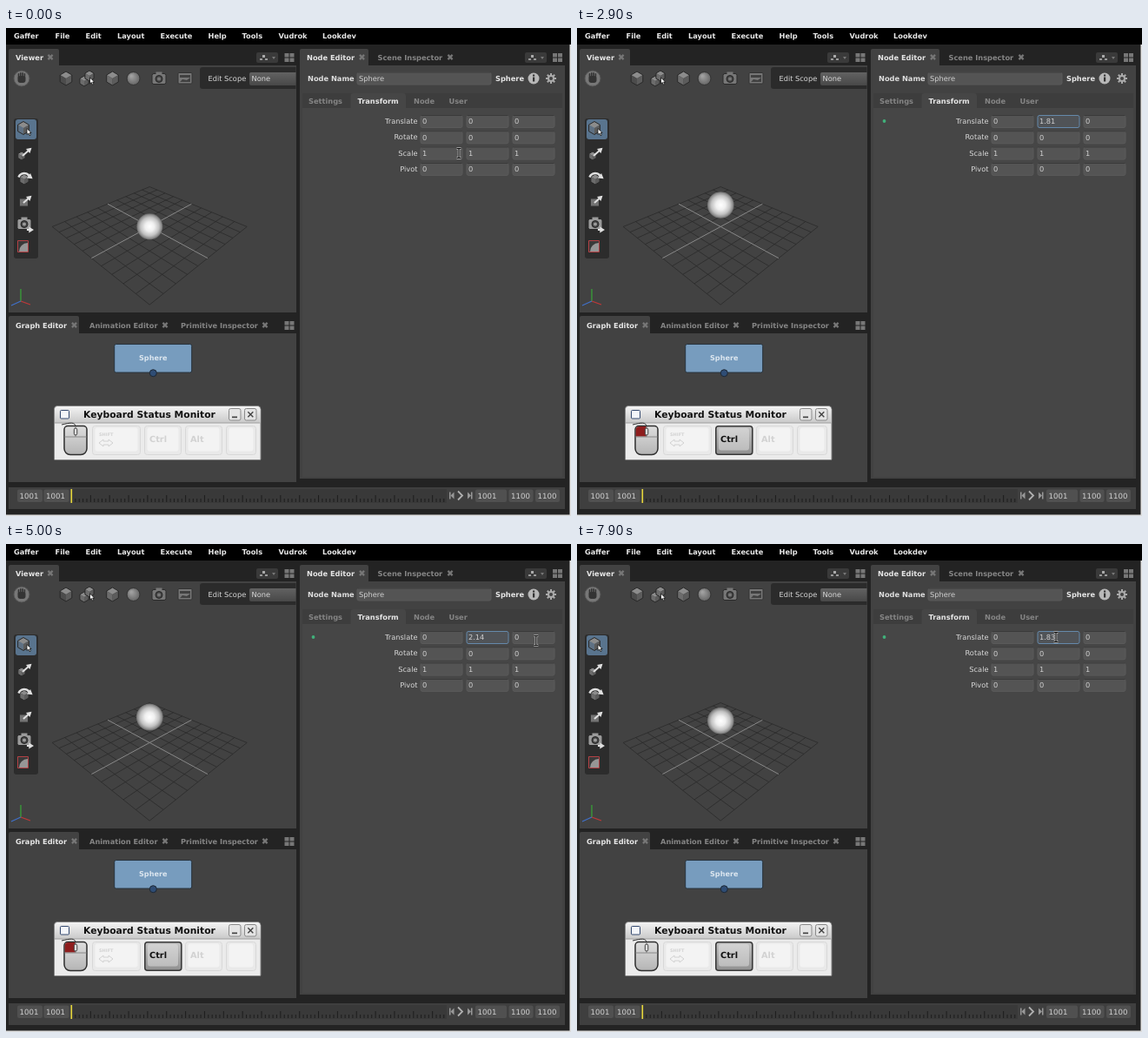
These frames come from a looping animation (650x561 px, 8000 ms). An HTML page with a canvas:

```html
<!DOCTYPE html>
<html lang="en">
<head>
<meta charset="utf-8">
<title>Numeric field dragging</title>
<style>
html, body { margin: 0; width: 100%; height: 100%; overflow: hidden; background: #232323; }
canvas { display: block; width: 650px; height: 561px; }
</style>
</head>
<body>
<canvas id="stage" width="650" height="561"></canvas>
<script>
const ctx = document.getElementById('stage').getContext('2d');
const LOOP = 8000, STEP = 100;

// Tracks hold [time, ...values] and are read with linear interpolation.
const POINTER = [
  [0, 521, 144], [700, 582, 107], [900, 560, 105], [1200, 558, 105], [1300, 551, 107],
  [1900, 551, 107], [2500, 621, 107], [2900, 732, 108], [3200, 752, 109], [3400, 642, 110],
  [4100, 550, 112], [4300, 549, 112], [4600, 549, 112], [5100, 625, 111], [5400, 618, 111],
  [5600, 558, 111], [5900, 574, 108], [7500, 574, 108], [7900, 551, 107]
];
const HEIGHT = [
  [1900, 0], [2500, 0.71], [2900, 1.81], [3200, 3], [3400, 2.48], [4100, 1.53],
  [4600, 1.53], [5100, 2.29], [5400, 2.2], [5600, 1.63], [5900, 1.83]
];
const PRESSED = [[900, 1200], [1700, 4400], [4600, 6200]];
const CTRL = [[1500, 6600], [7100, LOOP]];
const CARET = [[1000, 1500], [6100, 6600], [7100, 7600]];

const during = (spans, t) => spans.some(([a, b]) => t >= a && t < b);

function sample(track, t) {
  const next = track.findIndex(key => key[0] > t);
  if (next === 0) return track[0].slice(1);
  if (next < 0) return track[track.length - 1].slice(1);
  const a = track[next - 1], b = track[next], f = (t - a[0]) / (b[0] - a[0]);
  return a.slice(1).map((v, i) => v + (b[i + 1] - v) * f);
}

function rect(x, y, w, h, fill, radius = 0, stroke, width = 1) {
  ctx.beginPath();
  ctx.roundRect(x, y, w, h, radius);
  if (fill) { ctx.fillStyle = fill; ctx.fill(); }
  if (stroke) { ctx.strokeStyle = stroke; ctx.lineWidth = width; ctx.stroke(); }
}

function line(points, color, width = 1, close = false, fill) {
  ctx.beginPath();
  points.forEach(([x, y], i) => i ? ctx.lineTo(x, y) : ctx.moveTo(x, y));
  if (close) ctx.closePath();
  if (fill) { ctx.fillStyle = fill; ctx.fill(); }
  if (color) { ctx.strokeStyle = color; ctx.lineWidth = width; ctx.stroke(); }
}

function disc(x, y, r, fill, stroke, width = 1) {
  ctx.beginPath();
  ctx.arc(x, y, r, 0, 7);
  if (fill) { ctx.fillStyle = fill; ctx.fill(); }
  if (stroke) { ctx.strokeStyle = stroke; ctx.lineWidth = width; ctx.stroke(); }
}

function text(str, x, y, color, { bold = false, size = 8.25, align = 'left' } = {}) {
  ctx.font = `${bold ? 'bold ' : ''}${size}px "DejaVu Sans", sans-serif`;
  ctx.textRendering = 'geometricPrecision';
  ctx.textAlign = align;
  ctx.fillStyle = color;
  ctx.fillText(str, x, y);
}
const bold = (str, x, y, color) => text(str, x, y, color, { bold: true });

function vertical(y0, y1, ...colors) {
  const g = ctx.createLinearGradient(0, y0, 0, y1);
  colors.forEach((c, i) => g.addColorStop(i / (colors.length - 1), c));
  return g;
}

function cross(x, y, r, color, width) {
  line([[x - r, y - r], [x + r, y + r]], color, width);
  line([[x + r, y - r], [x - r, y + r]], color, width);
}

function field(x, y, w, str, focused = false) {
  rect(x + .5, y + .5, w - 1, 14, focused ? '#505357' : '#545454', 2, focused ? '#6589ab' : '#5a5a5a');
  if (!focused) rect(x + 1, y, w - 2, 1, '#3a3a3a');
  text(str, x + 2.5, y + 10.2, '#d0d0d0');
}

function tab(label, x, closeX, y, active) {
  bold(label, x, y + 3, active ? '#e6e6e6' : '#858585');
  cross(closeX, y, 2.6, '#777', 2.2);
}

function layoutButton(x, y) {
  for (let i = 0; i < 4; i++) rect(x - 5.5 + (i % 2) * 6, y - 5 + (i >> 1) * 5.5, 5, 4.5, '#777');
}

function pinButton(x, y) {
  rect(x - 13, y - 6, 25, 12, '#3a3a3a', 2);
  rect(x - 6, y - 3, 3, 3, '#aaa');
  rect(x - 9, y + 1, 3, 2, '#999');
  rect(x - 3, y + 1, 3, 2, '#999');
  line([[x + 5, y - 1], [x + 9, y - 1], [x + 7, y + 2]], null, 1, true, '#777');
}

function cube(x, y, r, face = '#6c6c6c') {
  const h = r * .5, w = r * .85;
  line([[x, y - r], [x + w, y - h], [x, y], [x - w, y - h]], null, 1, true, '#8c8c8c');
  line([[x - w, y - h], [x, y], [x, y + r], [x - w, y + h]], null, 1, true, face);
  line([[x + w, y - h], [x, y], [x, y + r], [x + w, y + h]], null, 1, true, '#5c5c5c');
  line([[x, y - r], [x + w, y - h], [x + w, y + h], [x, y + r], [x - w, y + h], [x - w, y - h]], '#292929', 1, true);
}

function camera(x, y, color) {
  rect(x - 8, y - 5, 16, 12, color, 2, '#2a2a2a');
  rect(x - 3.5, y - 7, 7, 3, color);
  disc(x, y + 1, 4, '#444', '#262626');
  disc(x, y + 1, 2, color);
}

function arrow(x0, y0, x1, y1, color) {
  const a = Math.atan2(y1 - y0, x1 - x0), p = (s, d) => [x1 + Math.cos(a + s) * d, y1 + Math.sin(a + s) * d];
  line([[x0, y0], [x1, y1]], color, 2);
  line([p(0, 2), p(2.4, 5), p(-2.4, 5)], null, 1, true, color);
}

function arrowPointer(x, y) {
  line([[x, y], [x, y + 7], [x + 1.8, y + 5.5], [x + 3, y + 8.2], [x + 4.3, y + 7.6],
    [x + 3.2, y + 5], [x + 5.2, y + 5]], '#111', .8, true, '#fff');
}

function chrome() {
  rect(0, 0, 650, 561, '#232323');
  rect(0, 0, 650, 19, '#000');
  const menu = [['Gaffer', 9], ['File', 56.5], ['Edit', 91.5], ['Layout', 128], ['Execute', 177.5],
    ['Help', 232.5], ['Tools', 271.5], ['Vudrok', 313.5], ['Lookdev', 364]];
  for (const [label, x] of menu) bold(label, x, 12, '#e8e8e8');

  for (const [x, y, w, h] of [[3, 43, 331, 284], [3, 351, 331, 171], [338, 43, 305, 475]])
    rect(x, y, w, h, '#424242');
  for (const [x, y, w] of [[3, 24, 58], [3, 331, 81], [338, 24, 79]])
    rect(x, y, w, 21, '#424242', [2, 2, 0, 0]);

  tab('Viewer', 11, 51, 33.5, true);
  tab('Graph Editor', 11, 78.5, 341.5, true);
  tab('Animation Editor', 96, 183, 341.5, false);
  tab('Primitive Inspector', 201, 298, 341.5, false);
  tab('Node Editor', 346, 409.5, 33.5, true);
  tab('Scene Inspector', 427.5, 511, 33.5, false);
  pinButton(301, 34);
  pinButton(610, 34);
  layoutButton(326, 34);
  layoutButton(634.5, 34);
  layoutButton(326, 342);

  rect(648.5, 19, 1.5, 542, '#e4e4e4');
  rect(0, 559.5, 650, 1.5, '#dcdcdc');
}

function viewerTools() {
  disc(18, 58, 9, '#777', '#555');
  rect(13.5, 55, 9, 8, '#343434', 3);
  for (let i = 0; i < 4; i++) rect(13.7 + i * 2.3, 52 - (i % 3 ? 1 : 0), 1.6, 6, '#343434', 1);

  cube(69, 58, 8, '#4c4c4c');
  cube(90, 61, 6); cube(96, 55, 6);
  arrowPointer(96.5, 57);
  cube(122.5, 58, 8);
  const ball = ctx.createRadialGradient(144, 55, 1, 146.5, 58, 8);
  ball.addColorStop(0, '#a0a0a0');
  ball.addColorStop(1, '#646464');
  disc(146.5, 58, 7.5, ball, '#333');
  camera(176, 57.5, '#777');
  rect(198, 51.5, 16, 12.5, '#777', 1, '#333');
  rect(200, 54, 12, 3, '#404040');
  line([[200, 62], [203, 59], [208, 60], [212, 57], [212, 62]], null, 1, true, '#404040');

  rect(223, 45, 110.5, 25, '#2b2b2b', [3, 0, 0, 3]);
  text('Edit Scope', 232.5, 60.5, '#d8d8d8');
  rect(280, 51, 53.5, 15, vertical(51, 66, '#626262', '#484848'), [2, 0, 0, 2]);
  text('None', 282.5, 60.5, '#d8d8d8');

  rect(9, 104, 28, 161, '#2c2c2c', 3);
  rect(11, 105, 24, 23, '#59748e', 3);
  cube(20, 115, 7.5, '#5f7183');
  arrowPointer(24, 115.5);
  cube(18, 147, 5);
  arrow(19, 147, 28, 139, '#e0e0e0');
  cube(21, 174, 6);
  ctx.beginPath();
  ctx.arc(21, 174, 7, 3.5, 5.6);
  ctx.strokeStyle = '#e0e0e0';
  ctx.lineWidth = 2.5;
  ctx.stroke();
  arrow(25, 169, 29, 172, '#e0e0e0');
  rect(15.5, 196, 10, 9, '#737373', 0, '#303030');
  arrow(20, 201, 28, 194, '#e0e0e0');
  camera(21, 224.5, '#9b9b9b');
  arrow(24, 232, 30, 232, '#e0e0e0');
  rect(13.5, 244.5, 12, 13, '#393939', 0, '#b34145');
  ctx.beginPath();
  ctx.moveTo(25, 257);
  ctx.lineTo(15, 257);
  ctx.arc(25, 257, 10, Math.PI, Math.PI * 1.5);
  ctx.fillStyle = '#969696';
  ctx.fill();
}

// Ground plane coordinates run from -1 to 1 along each side.
function project(u, v) {
  const side = (u - v) / 2, depth = (u + v) / 2, w = 1 - .3235 * depth;
  return [165.2 + 112 * side / w, 228.4 + 60.7 * depth / w];
}

function scene(height) {
  for (const i of [-5, -4, -3, -2, -1, 1, 2, 3, 4, 5, 0]) {
    const k = i / 5, color = i ? '#282828' : '#888', width = i ? .75 : 1;
    line([project(k, -1), project(k, 1)], color, width);
    line([project(-1, k), project(1, k)], color, width);
  }

  const y = 228.3 - 13.7 * height, r = 15 + .2 * height;
  const shade = ctx.createRadialGradient(165.3, y, 0, 165.3, y, r);
  for (const [at, c] of [[0, '#fff'], [.35, '#f0f0f0'], [.7, '#c2c2c2'], [.9, '#8e8e8e'], [1, '#666']])
    shade.addColorStop(at, c);
  disc(165.3, y, r, shade);

  line([[17, 314], [17, 300]], '#38a038', 1.3);
  line([[17, 314], [28, 318]], '#c03838', 1.3);
  line([[17, 314], [6, 319]], '#4070c8', 1.3);
}

function graph() {
  rect(124.7, 363.5, 89, 32.5, '#779cbe', 2, '#26323d');
  text('Sphere', 169.2, 382.2, '#dce6ef', { bold: true, size: 8.1, align: 'center' });
  disc(169.3, 396.7, 4, '#2f4d75', '#1d2733');
}

function nodeEditor(value, focused, caret) {
  bold('Node Name', 347, 60.5, '#dedede');
  field(403.5, 50.5, 155, 'Sphere');
  bold('Sphere', 563, 60.5, '#e6e6e6');
  disc(607, 58, 6.5, '#b8b8b8');
  rect(606, 56.5, 2.2, 5, '#333');
  rect(606, 53.5, 2.2, 2, '#333');
  for (let i = 0; i < 8; i++) {
    const a = i * Math.PI / 4;
    line([[627, 58], [627 + 6 * Math.cos(a), 58 + 6 * Math.sin(a)]], '#aaa', 2);
  }
  disc(627, 58, 4, '#aaa');
  disc(627, 58, 2, '#424242');

  rect(341, 75, 299, 17, '#3d3d3d');
  rect(341, 92, 299, 424, '#464646');
  rect(396.5, 75, 63.5, 18, '#464646', [3, 3, 0, 0]);
  [['Settings', 348], ['Transform', 404.5], ['Node', 469], ['User', 509.5]]
    .forEach(([label, x], i) => bold(label, x, 86.5, i === 1 ? '#e6e6e6' : '#858585'));

  const number = String(+value.toFixed(2));
  ['Translate', 'Rotate', 'Scale', 'Pivot'].forEach((label, row) => {
    const y = 100 + row * 18.3;
    text(label, 473.5, y + 10, '#d8d8d8', { align: 'right' });
    [476.5, 529.5, 582.5].forEach((x, col) => {
      const moved = !row && col === 1;
      field(x, y, 49, moved ? number : row === 2 ? '1' : '0', moved && focused);
    });
  });
  if (value) disc(353.5, 107, 1.9, '#40b07a');
  if (caret) {
    ctx.font = '8.25px "DejaVu Sans", sans-serif';
    rect(532 + ctx.measureText(number).width, 102, 1, 11, '#e0e0e0');
  }
}

function timeline() {
  rect(3, 528, 640, 25, '#3f3f3f');
  rect(75, 530, 432, 16, '#393939');
  for (let i = 1; i < 99; i++) {
    const h = i % 5 ? 4 : 8;
    rect(75 + i * 4.37, 545 - h, 1, h, '#1d1d1d');
  }
  rect(74.5, 530, 1.6, 16, '#e8d83c');
  for (const [x, w, label] of [[13, 29, '1001'], [43.5, 29, '1001'], [540, 36, '1001'], [578.5, 28, '1100'], [609, 28, '1100']]) {
    rect(x, 530.5, w, 14.5, '#505050', 2);
    text(label, x + 2.5, 540.8, '#d0d0d0', { size: 8.6 });
  }
  rect(510, 533.5, 1.5, 8, '#999');
  line([[515.5, 533.5], [511.5, 537.5], [515.5, 541.5]], null, 1, true, '#999');
  line([[520, 532.5], [525, 537.5], [520, 542.5]], '#b0b0b0', 1.8);
  line([[531, 533.5], [535, 537.5], [531, 541.5]], null, 1, true, '#999');
  rect(535, 533.5, 1.5, 8, '#999');
}

function key(x, w, label, down) {
  if (down) {
    rect(x + .8, 457.8, w, 32.5, vertical(457, 491, '#c4c4c4', '#8f8f8f'), 3, '#3a3a3a', 1.6);
    rect(x + 4, 460, w - 7, 25.5, vertical(460, 486, '#d2d2d2', '#bcbcbc'), 3);
  } else {
    rect(x + .5, 457.5, w, 33, '#e9e9e9', 3, '#d8d8d8');
    rect(x + 3.5, 459.5, w - 6, 27, '#f3f3f3', 3);
  }
  if (label) text(label, x + 6, 475.7, down ? '#111' : '#d2d2d2', { bold: true, size: 9.8 });
}

function keyMonitor(ctrl, pressed) {
  rect(55.5, 434.5, 237.5, 62, '#ebebeb', [4, 4, 1, 1], '#828282');
  rect(56, 435, 236.5, 19, vertical(435, 454, '#f3f3f3', '#dedede', '#c9c9c9'), [4, 4, 0, 0]);
  rect(56, 453.5, 236.5, 1, '#a0a0a0');
  rect(62.5, 439.5, 10, 9.5, '#f4f6fa', 1, '#34496f');
  text('Keyboard Status Monitor', 89, 447.7, '#111', { bold: true, size: 10.75 });
  for (const x of [256.5, 274.5]) rect(x, 437.5, 13.5, 13.5, '#e4e4e4', 2, '#8b8b8b');
  rect(260, 446.5, 6, 1.7, '#444');
  cross(281.3, 444.3, 3, '#444', 1.4);

  ctx.beginPath();
  ctx.moveTo(80, 459);
  ctx.bezierCurveTo(80, 452, 73, 454, 64, 456);
  ctx.strokeStyle = '#333';
  ctx.lineWidth = 1;
  ctx.stroke();
  rect(67, 457.5, 26, 33, vertical(457, 491, '#dedede', '#b4b4b4'), [4, 4, 7, 7], '#2e2e2e', 1.5);
  if (pressed) rect(67.7, 458, 12, 11.5, '#8e1d1d', [4, 0, 0, 0]);
  line([[67, 470], [93, 470]], '#777', .8);
  line([[80, 458], [80, 470]], '#777', .8);
  rect(78.3, 460, 3.5, 8, '#ddd', 2, '#444');

  key(99, 55, '', false);
  text('SHIFT', 107, 469, '#d2d2d2', { bold: true, size: 5 });
  line([[107, 477], [112, 473], [112, 475], [118, 475], [118, 473], [123, 477],
    [118, 481], [118, 479], [112, 479], [112, 481]], '#d2d2d2', 1, true);
  key(159, 42, 'Ctrl', ctrl);
  key(206, 42, 'Alt', false);
  key(253, 34, '', false);
}

function textPointer(x, y) {
  const beam = (color, width) => {
    line([[x, y - 5], [x, y + 5]], color, width);
    for (const s of [-1, 1]) line([[x - 2.5, y + s * 5.5], [x + 2.5, y + s * 5.5]], color, width);
  };
  beam('#c8c8c8', 2.6);
  beam('#111', 1.2);
}

function draw(now) {
  const t = Math.floor((now % LOOP) / STEP) * STEP;
  const [value] = sample(HEIGHT, t);
  chrome();
  viewerTools();
  scene(value);
  graph();
  nodeEditor(value, t >= 1000, during(CARET, t));
  timeline();
  keyMonitor(during(CTRL, t), during(PRESSED, t));
  textPointer(...sample(POINTER, t));
}

let start;
function tick(now) {
  start ??= now;
  draw(now - start);
  requestAnimationFrame(tick);
}
draw(0);
requestAnimationFrame(tick);
</script>
</body>
</html>
```
